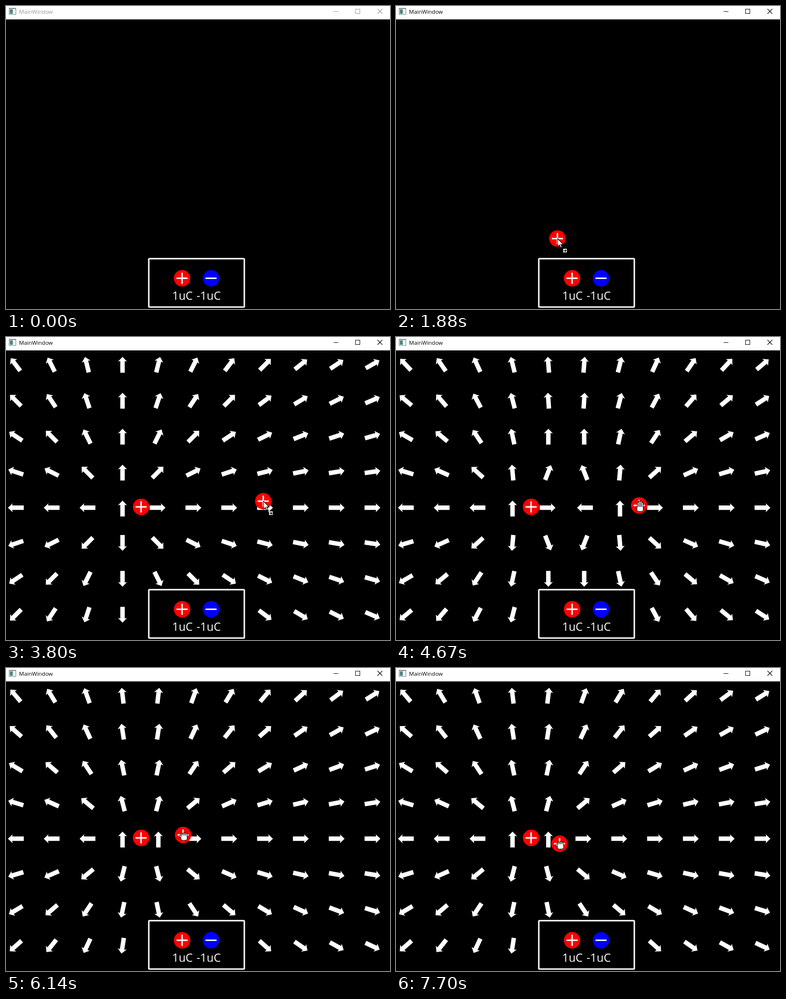
An HTML page with a canvas that plays this animation: 796 px wide and 626 px high, repeating every 8 s.

```html
<!DOCTYPE html>
<html lang="en">
<head>
<meta charset="utf-8">
<title>Electric field</title>
<style>
html, body { margin: 0; width: 100%; height: 100%; overflow: hidden; background: #000; }
canvas { display: block; }
</style>
</head>
<body>
<canvas id="stage" width="796" height="626"></canvas>
<script>
const ctx = document.getElementById('stage').getContext('2d');
const LOOP = 8000, CELL = 74.25, BAR = 27, RADIUS = 17, LAG = 30;
const COLS = 11, ROWS = 8;
const ENTER = 460, ACTIVATE = 1740, DROP_1 = 2250, DROP_2 = 4300, HOVER = 4670, GRAB = 4790;

const point = (x, y) => ({ x, y });
const PLUS = point(365, 562.5), MINUS = point(425, 562.5);
const PICKUP = point(362, 564);
const FIRST = point(280, 351), SECOND = point(504, 348);

// Eased pointer gestures; bow swings the route sideways.
const move = (from, until, to, bow = point(0, 0)) => ({ from, until, to, bow });
const ENTRY = point(698, 600);
const MOVES = [
  move(ENTER, 640, point(295, 384)),
  move(850, 1350, point(434, 573), point(-255, 0)),
  move(1350, 1600, PICKUP),
  move(ACTIVATE, 2070, FIRST, point(5, 0)),
  move(2470, 3270, PICKUP, point(136, 19)),
  move(3320, 3870, point(541, 329)),
  move(4010, 4280, SECOND),
  move(4980, 5600, point(367, 345)),
  move(6140, 6400, point(400, 350)),
  move(6750, 7500, point(348, 364), point(77, 2)),
  move(7570, 7670, point(339, 363))
];

const POINTER = new Path2D('M.5 0 V16.5 L4.3 13 L6.9 19 L9.5 17.8 L7 12 H12 Z');
const ARROW = new Path2D('M0 -14.8 L9.3 -5 L4.6 -6 V18 H-4.6 V-6 L-9.3 -5 Z');

const ease = k => k * k * (3 - 2 * k);

function pointerAt(t) {
  let pos = ENTRY;
  for (const { from, until, to, bow } of MOVES) {
    if (t < from) break;
    const k = ease(Math.min(1, (t - from) / (until - from)));
    const swing = Math.sin(Math.PI * k);
    pos = point(
      pos.x + (to.x - pos.x) * k + bow.x * swing,
      pos.y + (to.y - pos.y) * k + bow.y * swing
    );
  }
  return pos;
}

function rect(color, x, y, w, h) {
  ctx.fillStyle = color;
  ctx.fillRect(x, y, w, h);
}

function line(color, width, x0, y0, x1, y1) {
  ctx.strokeStyle = color;
  ctx.lineWidth = width;
  ctx.beginPath();
  ctx.moveTo(x0, y0);
  ctx.lineTo(x1, y1);
  ctx.stroke();
}

function text(str, x, y, font, color) {
  ctx.font = `${font} "Open Sans", "Noto Sans", sans-serif`;
  ctx.fillStyle = color;
  ctx.fillText(str, x, y);
}

function drawTitleBar(active) {
  const ink = active ? '#000' : '#999';
  rect('#fff', 0, 0, 796, BAR);
  rect('#aaa', 0, BAR, 796, 1);
  rect('#7d878d', 6, 4, 15, 14);
  rect('#eef1f2', 7, 6, 13, 11);
  rect('#47897f', 8, 7, 6, 9);
  text('MainWindow', 27, 16, '11.5px', ink);
  line(ink, 1, 679, 11.5, 689, 11.5);
  ctx.strokeRect(724.5, 6.5, 9, 9);
  line(ink, 1.1, 770, 6, 780, 16);
  line(ink, 1.1, 780, 6, 770, 16);
}

function drawCharge({ x, y }, positive = true) {
  const arm = 11.5;
  ctx.fillStyle = positive ? '#f00' : '#00f';
  ctx.beginPath();
  ctx.arc(x, y, RADIUS, 0, Math.PI * 2);
  ctx.fill();
  line('#fff', 3, x - arm, y, x + arm, y);
  if (positive) line('#fff', 3, x, y - arm, x, y + arm);
}

// Inverse-square field between grid cells; occupied cells point up.
function fieldAngle(col, row, sources) {
  let ex = 0, ey = 0;
  for (const s of sources) {
    const dx = col - s.col, dy = row - s.row;
    const r = Math.hypot(dx, dy);
    if (r === 0) return 0;
    ex += dx / r ** 3;
    ey += dy / r ** 3;
  }
  return ex || ey ? Math.atan2(ey, ex) + Math.PI / 2 : -Math.PI / 2;
}

function drawField(charges) {
  const sources = charges.map(c => ({
    col: Math.floor(c.x / CELL), row: Math.floor((c.y - BAR) / CELL)
  }));
  ctx.fillStyle = '#fff';
  for (let row = 0; row < ROWS; row++) {
    for (let col = 0; col < COLS; col++) {
      ctx.save();
      ctx.translate(18.8 + col * CELL, 55.7 + row * CELL);
      ctx.rotate(fieldAngle(col, row, sources));
      ctx.fill(ARROW);
      ctx.restore();
    }
  }
}

function drawToolbox() {
  ctx.beginPath();
  ctx.roundRect(296, 522, 198, 100, 1.5);
  ctx.fillStyle = '#000';
  ctx.fill();
  ctx.strokeStyle = '#fff';
  ctx.lineWidth = 3;
  ctx.stroke();
  drawCharge(PLUS);
  drawCharge(MINUS, false);
  text('1uC', 344.5, 607, '500 23.5px', '#fff');
  text('-1uC', 395, 607, '500 23.5px', '#fff');
}

function outlined(shape) {
  ctx.fillStyle = '#fff';
  ctx.strokeStyle = '#000';
  ctx.lineWidth = 1.2;
  ctx.fill(shape);
  ctx.stroke(shape);
}

function pill(x, y, w, h, r) {
  const shape = new Path2D();
  shape.roundRect(x, y, w, h, r);
  return shape;
}

function drawHand(open) {
  const knuckle = open ? 2 : 0, tip = open ? -9.5 : -4.5, spread = open ? 1.2 : 0.4;
  const wrist = open ? 12.5 : 11;
  outlined(pill(open ? -6.5 : -7.5, knuckle, 6, 6, 3));
  outlined(pill(-4.5, knuckle, 13, wrist - knuckle, 4));
  for (let i = 0; i < 4; i++) {
    const top = tip + spread * (i - 1.4) ** 2;
    outlined(pill(-3.5 + i * 3, top, 3, knuckle + 3 - top, 1.5));
  }
  ctx.fill(pill(-4, knuckle + 1, 12, wrist - knuckle - 2, 3));
}

function drawCursor(pos, kind) {
  ctx.save();
  ctx.translate(pos.x, pos.y);
  if (kind === 'open' || kind === 'fist') drawHand(kind === 'open');
  else outlined(POINTER);
  if (kind === 'drag') {
    rect('#fff', 12, 21, 7.5, 7.5);
    line('#000', 1.4, 13, 25, 18, 25);
    line('#000', 1.4, 15.5, 22.5, 18, 25);
    line('#000', 1.4, 15.5, 27.5, 18, 25);
  }
  ctx.restore();
}

function cursorKind(t, pos, charges, dragging) {
  if (dragging) return 'drag';
  if (t >= GRAB) return 'fist';
  const settled = (t >= DROP_1 && t < 2470) || (t >= DROP_2 && t < HOVER);
  const over = [PLUS, MINUS, ...charges].some(c => Math.hypot(c.x - pos.x, c.y - pos.y) < RADIUS);
  return over && !settled ? 'open' : 'arrow';
}

function draw(t) {
  const pos = pointerAt(t);
  const dragging = (t >= ACTIVATE && t < DROP_1) || (t >= 3400 && t < DROP_2);
  const charges = [];
  if (t >= DROP_1) charges.push(FIRST);
  if (t >= DROP_2) charges.push(t < GRAB ? SECOND : pointerAt(t - LAG));

  rect('#000', 0, 0, 796, 626);
  drawTitleBar(t >= ACTIVATE);
  if (charges.length) drawField(charges);
  drawToolbox();
  charges.forEach(c => drawCharge(c));
  if (dragging) drawCharge(pos);
  if (t >= ENTER) drawCursor(pos, cursorKind(t, pos, charges, dragging));
}

const start = performance.now();
function tick() {
  draw((performance.now() - start) % LOOP);
  requestAnimationFrame(tick);
}
tick();
</script>
</body>
</html>
```
